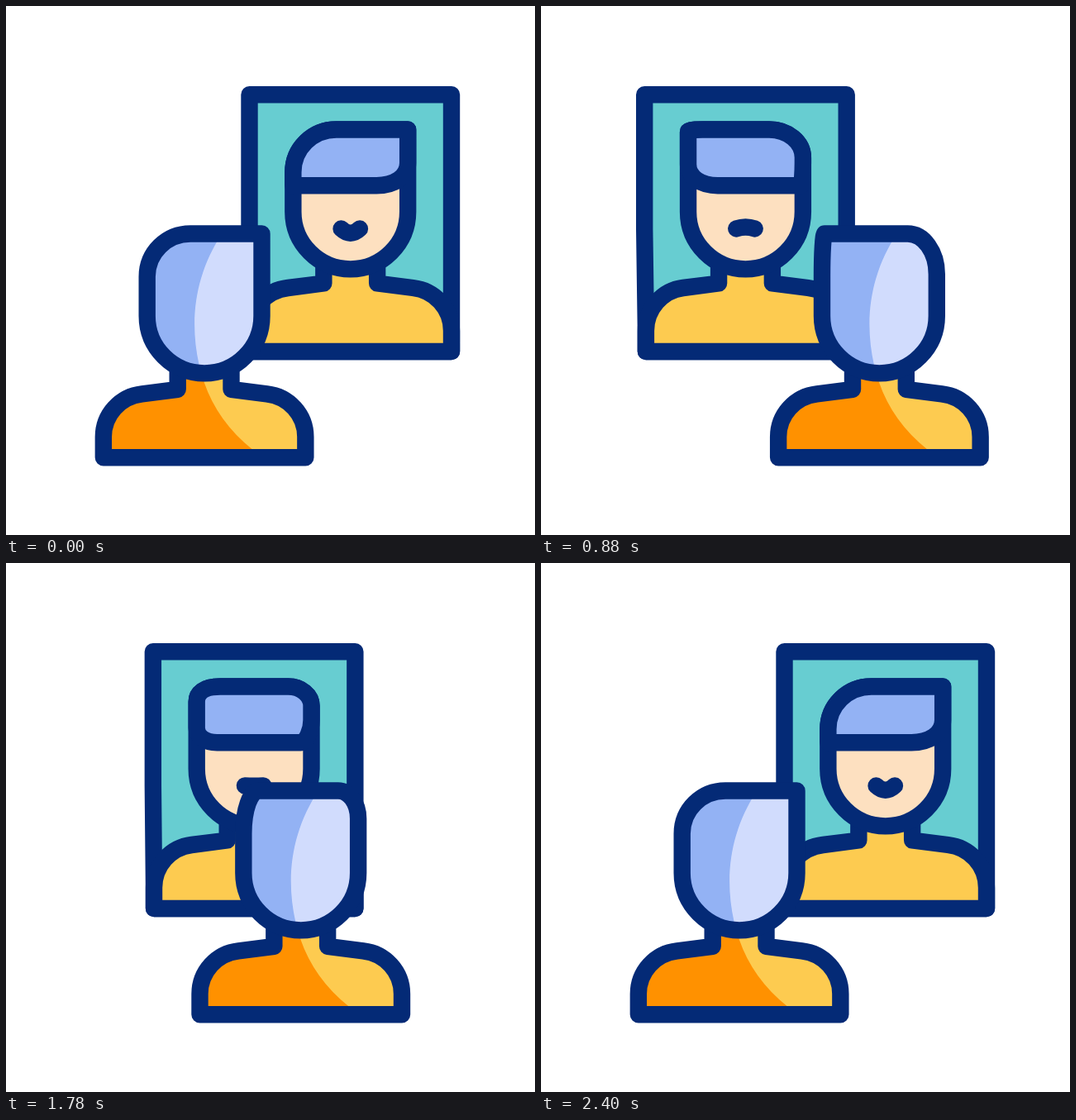
Recreate the animation shown at these times as an HTML page with a canvas. Size 640x640 px, loop 2420 ms.

```html
<!DOCTYPE html>
<html lang="en">
<head>
<meta charset="utf-8">
<title>Person and portrait</title>
<style>
  html, body { margin: 0; width: 100%; height: 100%; overflow: hidden; background: #fff; }
  canvas { display: block; width: 640px; height: 640px; }
</style>
</head>
<body>
<canvas id="stage" width="640" height="640"></canvas>
<script>
const ctx = document.getElementById('stage').getContext('2d');

const NAVY = '#042a76', TEAL = '#67cdd1', HAIR = '#93b2f4', SHINE = '#d1dcfd';
const SKIN = '#fde0c0', ORANGE = '#ff9100', YELLOW = '#fdcb50', WHITE = '#fff';

const LOOP = 2420, STEP = 20;
const MOVE = 1033.3, BACK = 1366.7, TRAVEL = 180;
const HEAD = 69.4;   // half width of a head
const BODY = 122.25; // half width of a body and of the frame

const mix = (a, b, p) => a + (b - a) * p;
const smooth = s => {
  s = Math.min(1, Math.max(0, s));
  return s * s * (3 - 2 * s);
};

function paint(path, fill) {
  if (fill) {
    ctx.fillStyle = fill;
    ctx.fill(path);
  }
  ctx.stroke(path);
}

// Fills a path in two colours, divided by a second region.
function paintSplit(path, left, right, region) {
  ctx.fillStyle = right;
  ctx.fill(path);
  ctx.save();
  ctx.clip(path);
  ctx.fillStyle = left;
  ctx.fill(region);
  ctx.restore();
  ctx.stroke(path);
}

// Shoulders and neck; y is the base line, dx shifts the lower left side.
function bodyPath(y, dx) {
  const path = new Path2D();
  path.moveTo(-BODY + dx, y);
  path.lineTo(-BODY + dx, y - 25);
  path.bezierCurveTo(-BODY + dx, y - 52, -102 + dx, y - 74, -75.5, y - 77);
  path.lineTo(-32.4, y - 82.5);
  path.lineTo(-32.4, y - 108);
  path.lineTo(32.4, y - 108);
  path.lineTo(32.4, y - 82.5);
  path.lineTo(75.5, y - 77);
  path.bezierCurveTo(102, y - 74, BODY, y - 52, BODY, y - 25);
  path.lineTo(BODY, y);
  path.closePath();
  return path;
}

// Upper contour from the left side to the right side.
function crown(path, y, k) {
  path.lineTo(-HEAD, y + k.leftY);
  path.bezierCurveTo(-HEAD, y + k.leftY - k.leftUp,
    k.leftX - k.leftOut, y, k.leftX, y);
  path.lineTo(k.rightX, y);
  path.bezierCurveTo(k.rightX + k.rightOut, y,
    HEAD, y + k.rightY - k.rightUp, HEAD, y + k.rightY);
}

function headPath(y, k) {
  const path = new Path2D(), low = y + 99.5, r = 38.3;
  path.moveTo(-HEAD, low);
  crown(path, y, k);
  path.lineTo(HEAD, low);
  path.bezierCurveTo(HEAD, low + r, r, low + HEAD, 0, low + HEAD);
  path.bezierCurveTo(-r, low + HEAD, -HEAD, low + r, -HEAD, low);
  path.closePath();
  return path;
}

function hairPath(y, k, p) {
  const path = new Path2D(), band = 217.2;
  const leftX = mix(-HEAD, -31.5, p), leftY = mix(band, 190, p);
  const rightX = mix(31.5, HEAD, p);
  path.moveTo(leftX, band);
  path.bezierCurveTo(leftX - 21 * p, band, -HEAD, leftY + 17 * p, -HEAD, leftY);
  crown(path, y, k);
  path.lineTo(HEAD, 190);
  path.bezierCurveTo(HEAD, mix(207, 199, p), rightX + 21 * (1 - p), band, rightX, band);
  path.closePath();
  return path;
}

function drawPortrait(p) {
  const lean = 1.8 * p;
  const frame = new Path2D();
  frame.moveTo(-BODY, 107.3);
  frame.lineTo(BODY, 107.3);
  frame.lineTo(BODY, 418);
  frame.lineTo(-BODY + lean, 418);
  frame.lineTo(-BODY + lean, 392);
  frame.lineTo(-BODY, 270);
  frame.closePath();
  paint(frame, TEAL);
  paint(bodyPath(418, lean), YELLOW);

  const k = {
    leftX: mix(-17, -54, p), leftY: mix(51.7, 0, p),
    leftOut: mix(29, 15, p), leftUp: mix(29, 0, p),
    rightX: mix(HEAD, 26, p), rightY: 36 * p,
    rightOut: 24 * p, rightUp: 20 * p
  };
  paint(headPath(149.5, k), SKIN);
  paint(hairPath(149.5, k, p), HAIR);

  const mouth = new Path2D();
  mouth.moveTo(-11.2, 269.4);
  mouth.quadraticCurveTo(0, mix(280, 264.6, p), 11.2, 269.4);
  paint(mouth);
}

function drawViewer(p) {
  const shade = new Path2D();
  shade.moveTo(-140, 440);
  shade.lineTo(-3, 440);
  shade.lineTo(-0.5, 455);
  shade.quadraticCurveTo(16, 503, 58, 536.5);
  shade.lineTo(70, 546);
  shade.lineTo(-140, 546);
  shade.closePath();
  paintSplit(bodyPath(546.3, 0), ORANGE, YELLOW, shade);

  const k = {
    leftX: mix(-17, -HEAD, p), leftY: 52,
    leftOut: mix(29, 0, p), leftUp: 29,
    rightX: mix(HEAD, 32, p), rightY: 52 * p,
    rightOut: 20.7 * p, rightUp: 28.7 * p
  };
  const side = new Path2D();
  side.moveTo(-80, 270);
  side.lineTo(25, 270);
  side.bezierCurveTo(0, 305, -12, 345, -12, 385);
  side.bezierCurveTo(-12, 402, -10, 418, -6.5, 434);
  side.lineTo(-4, 446);
  side.lineTo(-80, 446);
  side.closePath();
  paintSplit(headPath(275.5, k), HAIR, SHINE, side);
}

function at(x, draw, p) {
  ctx.save();
  ctx.translate(x, 0);
  draw(p);
  ctx.restore();
}

function render(now) {
  const t = Math.floor((now % LOOP) / STEP) * STEP;
  const p = smooth(t / MOVE) - smooth((t - BACK) / MOVE);
  ctx.fillStyle = WHITE;
  ctx.fillRect(0, 0, 640, 640);
  ctx.strokeStyle = NAVY;
  ctx.lineWidth = 20.4;
  ctx.lineCap = ctx.lineJoin = 'round';
  at(416.75 - TRAVEL * p, drawPortrait, p);
  at(240.1 + TRAVEL * p, drawViewer, p);
}

const start = performance.now();
function tick() {
  render(performance.now() - start);
  requestAnimationFrame(tick);
}
tick();
</script>
</body>
</html>
```
